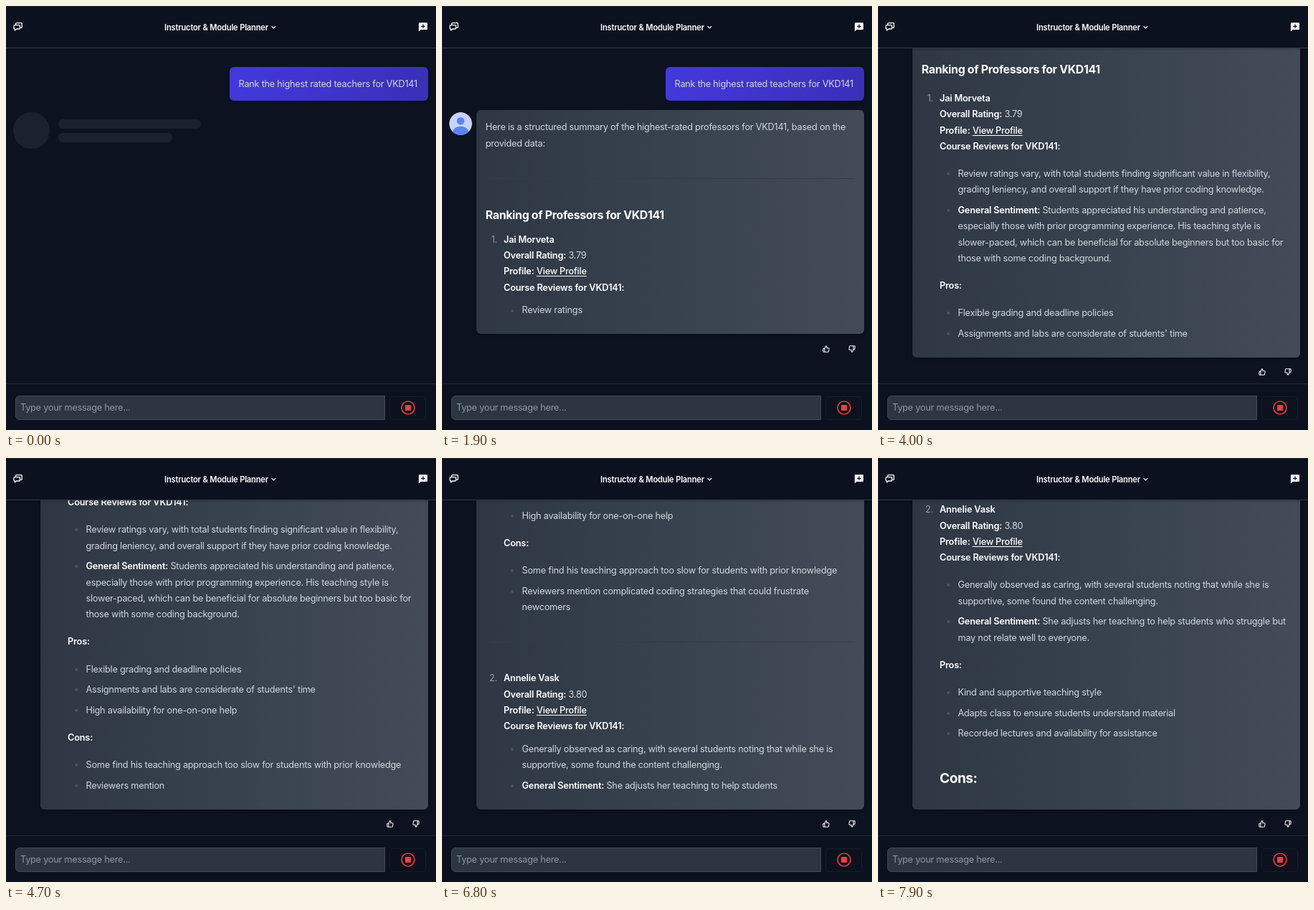
These frames come from a looping animation (600 px wide and 591 px high, 8000 ms). An HTML page:

```html
<!DOCTYPE html>
<html lang="en">
<head>
<meta charset="utf-8">
<title>Chat</title>
<style>
  html, body { margin: 0; width: 100%; height: 100%; overflow: hidden; background: #0c1220; }
  body { position: relative; font: 12.73px/22.28px Inter, "Liberation Sans", sans-serif; letter-spacing: -.019em; color: #d1d5db; }
  div, svg { position: absolute; box-sizing: border-box; }
  svg { overflow: visible; fill: none; stroke: #fff; stroke-linecap: round; stroke-linejoin: round; }
  b { font-weight: 600; color: #fff; letter-spacing: -.014em; }
  u { font-weight: 500; color: #fff; text-underline-offset: 2px; text-decoration-thickness: 1px; }
  #feed { left: 0; top: 0; width: 600px; height: 526px; overflow: hidden; }
  #roll { left: 0; top: 0; width: 600px; height: 526px; }
  #ask { left: 312px; top: 84.5px; width: 277px; height: 47.7px; border-radius: 6px; padding: 13.2px 0 0 12.5px;
    white-space: pre; background: linear-gradient(to right, #4338dc, #3a2fb8); box-shadow: 0 2px 4px rgba(0,0,0,.2); }
  #panel { left: 48px; top: 145px; width: 541px; border-radius: 6px;
    background: linear-gradient(to right, #2e3743, #39434f 55%, #434b57); box-shadow: 0 2px 4px rgba(0,0,0,.2); }
  .line { white-space: pre; }
  .rule { left: 13px; width: 515px; height: 1px; background: #333c48; }
  .num { left: -1px; color: #969ca7; width: 30px; text-align: right; }
  .bullet { left: 47.8px; width: 4px; height: 4px; border-radius: 50%; background: #4b5563; }
  .h3 b { font-size: 15.9px; font-weight: 700; letter-spacing: -.02em; }
  .h2 b { font-size: 19.1px; font-weight: 700; letter-spacing: -.025em; }
  .bone { background: #1b212f; border-radius: 6px; }
  #head { left: 0; top: 0; width: 600px; height: 59px; background: #0c111f; border-top: 1px solid #1f2530;
    border-bottom: 1px solid #353c47; box-shadow: 0 1px 3px rgba(0,0,0,.25); }
  #title { left: 221px; top: 17.9px; font-size: 11.14px; font-weight: 600; color: #fff; letter-spacing: -.016em; white-space: pre; }
  #foot { left: 0; top: 526px; width: 600px; height: 65px; background: #0c111e; border-top: 1px solid #1f2633; }
  #input { left: 12.5px; top: 15.5px; width: 516.5px; height: 34px; background: #2d3542; border: 1px solid #434b58;
    border-radius: 6px 0 0 6px; padding: 5px 0 0 6.5px; color: #8f96a3; white-space: pre; }
  #stop { left: 535px; top: 16.5px; width: 51px; height: 33px; border: 1px solid #161d2b; border-radius: 6px; }
</style>
</head>
<body>
<div id="feed"><div id="roll">
  <div id="ask">Rank the highest rated teachers for VKD141</div>
  <div id="wait">
    <div class="bone" style="left:9.5px;top:148px;width:51px;height:51px;border-radius:50%"></div>
    <div class="bone" style="left:73px;top:157.5px;width:199px;height:13px"></div>
    <div class="bone" style="left:73px;top:177px;width:159px;height:13px"></div>
  </div>
  <div id="reply">
    <svg style="left:9.5px;top:148px" width="32" height="32">
      <clipPath id="disc"><circle cx="16" cy="16" r="16"/></clipPath>
      <g stroke="none" clip-path="url(#disc)">
        <circle cx="16" cy="16" r="16" fill="#c7d3fb"/>
        <circle cx="16" cy="12.2" r="5.3" fill="#5c83f4"/>
        <ellipse cx="16" cy="27" rx="11" ry="7.2" fill="#5c83f4"/>
      </g>
    </svg>
    <div id="panel"></div>
    <div id="votes">
      <svg style="left:531px;top:-5px" width="10" height="10" viewBox="0 0 24 24" stroke-width="2.5"><path id="thumb" d="M14 9V5a3 3 0 0 0-3-3l-4 9v11h11.3a2 2 0 0 0 2-1.7l1.4-9a2 2 0 0 0-2-2.3zM7 22H4a2 2 0 0 1-2-2v-7a2 2 0 0 1 2-2h3"/></svg>
      <svg style="left:566.5px;top:-5px" width="10" height="10" viewBox="0 0 24 24" stroke-width="2.5"><use href="#thumb" transform="rotate(180 12 12)"/></svg>
    </div>
  </div>
</div></div>

<div id="head">
  <svg style="left:0;top:-1px" width="600" height="58" stroke-width="1.3">
    <path d="M13.6 26.6V24.6a1 1 0 0 1 1-1H21.2a1 1 0 0 1 1 1V29.4a1 1 0 0 1-1 1H19.6M12 26.7H18.4a1 1 0 0 1 1 1V31a1 1 0 0 1-1 1H14.6L12.4 34V32H12a1 1 0 0 1-1-1V27.7a1 1 0 0 1 1-1z"/>
    <path d="M370.8 28.4l2.6 2.6 2.6-2.6" stroke-width="1.1"/>
    <path d="M577 23.3H587a1 1 0 0 1 1 1V32a1 1 0 0 1-1 1H578.4L575.9 35.4V24.3a1 1 0 0 1 1.1-1z" fill="#fff" stroke="none"/>
    <path d="M582 26v4.6M579.7 28.3h4.6" stroke="#0c111f"/>
  </svg>
  <div id="title">Instructor &amp; Module Planner</div>
</div>
<div id="foot">
  <div id="input">Type your message here...</div>
  <div id="stop"></div>
  <svg style="left:551px;top:23px" width="20" height="20">
    <circle cx="10" cy="10" r="9" stroke="#e8383d" stroke-width="1.7"/>
    <rect x="6" y="6" width="8" height="8" rx="1" fill="#ef3d42" stroke="none"/>
  </svg>
</div>

<script>
const LOOP = 8000, STEP = 100, ROW = 22.28, TOP = 145, FLOOR = 489.7;
const LINK_TAIL = 57;            // hidden address streams after a link label
const LOOSE_AT = [3600, 7000];   // list item gains paragraph spacing
const LOOSE = 6.37;

// kind, text ("bold|rest"), start ms, end ms
const lines = [
  ['intro', 'Here is a structured summary of the highest-rated professors for VKD141, based on the', 150, 480],
  ['intro', 'provided data:', 480, 560],
  ['rule', '', 560, 600],
  ['h3', 'Ranking of Professors for VKD141', 610, 780],
  ['name', 'Jai Morveta|', 780, 900],
  ['item', 'Overall Rating:| 3.79', 950, 1100],
  ['link', 'Profile:| View Profile', 1150, 1600],
  ['item', 'Course Reviews for VKD141:|', 1600, 1800],
  ['dot', 'Review ratings vary, with total students finding significant value in flexibility,', 1800, 2370],
  ['more', 'grading leniency, and overall support if they have prior coding knowledge.', 2370, 2800],
  ['dot', 'General Sentiment:| Students appreciated his understanding and patience,', 2980, 3200],
  ['more', 'especially those with prior programming experience. His teaching style is', 3200, 3340],
  ['more', 'slower-paced, which can be beneficial for absolute beginners but too basic for', 3340, 3500],
  ['more', 'those with some coding background.', 3500, 3600],
  ['para', 'Pros:|', 3600, 3700],
  ['dot', 'Flexible grading and deadline policies', 3700, 3820],
  ['dot', "Assignments and labs are considerate of students' time", 3820, 4000],
  ['dot', 'High availability for one-on-one help', 4000, 4200],
  ['para', 'Cons:|', 4200, 4300],
  ['dot', 'Some find his teaching approach too slow for students with prior knowledge', 4300, 4600],
  ['dot', 'Reviewers mention complicated coding strategies that could frustrate', 4600, 4900],
  ['more', 'newcomers', 4900, 5000],
  ['rule', '', 5000, 5050],
  ['name', 'Annelie Vask|', 5080, 5200],
  ['item', 'Overall Rating:| 3.80', 5200, 5350],
  ['link', 'Profile:| View Profile', 5400, 5990],
  ['item', 'Course Reviews for VKD141:|', 5990, 6150],
  ['dot', 'Generally observed as caring, with several students noting that while she is', 6150, 6450],
  ['more', 'supportive, some found the content challenging.', 6450, 6600],
  ['dot', 'General Sentiment:| She adjusts her teaching to help students who struggle but', 6600, 6850],
  ['more', 'may not relate well to everyone.', 6850, 7000],
  ['para', 'Pros:|', 7000, 7100],
  ['dot', 'Kind and supportive teaching style', 7100, 7300],
  ['dot', 'Adapts class to ensure students understand material', 7300, 7500],
  ['dot', 'Recorded lectures and availability for assistance', 7500, 7700],
  ['h2', 'Cons:', 7800, 7900]
];

// left edge and space from the last line's middle to the panel's end
const look = {
  intro: [12.7, 24], rule: [12.7, 13], h3: [12.7, 35], name: [38, 30], item: [38, 30], link: [38, 30],
  dot: [63.5, 33.2], more: [63.5, 33.2], para: [38, 33.2], h2: [38, 43.8]
};

function gap(kind, prev, loose) {
  switch (kind) {
    case 'intro': return prev ? ROW : 23.9;
    case 'rule': return 49.3;
    case 'h3': return 51.5;
    case 'h2': return 62;
    case 'para': return 38.2;
    case 'name': return (prev === 'h3' ? 33.5 : 50) + loose;
    case 'dot': return prev === 'item' ? 31.8 + loose : prev === 'para' ? 38.2 : 28.65;
  }
  return ROW;
}

// whole words within the first n characters
const words = (s, n) => n >= s.length ? s : s.slice(0, Math.max(0, s.slice(0, n + 1).lastIndexOf(' ')));

function markup(kind, text, part) {
  if (kind === 'h3' || kind === 'h2') return `<b>${words(text, part * text.length)}</b>`;
  const cut = text.indexOf('|'), full = text.replace('|', '');
  const n = Math.floor(part * (full.length + (kind === 'link' ? LINK_TAIL : 0)));
  const shown = words(full, n);
  if (cut < 0) return shown;
  if (shown.length < cut) return '**' + shown;
  let rest = shown.slice(cut);
  if (kind === 'link' && rest) {
    const label = rest.trim();
    rest = part >= 1 ? ` <u>${label}</u>` : ` [${label}${shown === full ? '](' : ''}`;
  }
  return `<b>${full.slice(0, cut)}</b>${rest}`;
}

const $ = id => document.getElementById(id);

function draw(t) {
  let html = '', y = 0, prev = '', count = 0;
  for (const [kind, text, start, end] of lines) {
    if (t <= start) break;
    if (kind === 'name') count++;
    y += gap(kind, prev, t > LOOSE_AT[count - 1] ? LOOSE : 0);
    prev = kind;
    if (kind === 'rule') {
      html += `<div class="rule" style="top:${y - .5}px"></div>`;
      continue;
    }
    const top = y - ROW / 2 + .5;
    if (kind === 'name') html += `<div class="num" style="top:${top}px">${count}.</div>`;
    if (kind === 'dot') html += `<div class="bullet" style="top:${y - 1.5}px"></div>`;
    const part = Math.min(1, (t - start) / (end - start));
    html += `<div class="line ${kind}" style="left:${look[kind][0]}px;top:${top}px">${markup(kind, text, part)}</div>`;
  }
  const height = prev ? y + look[prev][1] : 0, bottom = TOP + height;
  $('wait').style.display = prev ? 'none' : '';
  $('reply').style.display = prev ? '' : 'none';
  $('panel').innerHTML = html;
  $('panel').style.height = height + 'px';
  $('votes').style.top = bottom + 20.6 + 'px';
  $('roll').style.top = Math.min(0, FLOOR - bottom) + 'px';
}

const begin = performance.now();
let last = -1;
function tick() {
  const t = Math.floor(((performance.now() - begin) % LOOP) / STEP) * STEP;
  if (t !== last) draw(last = t);
  requestAnimationFrame(tick);
}
tick();
</script>
</body>
</html>
```
